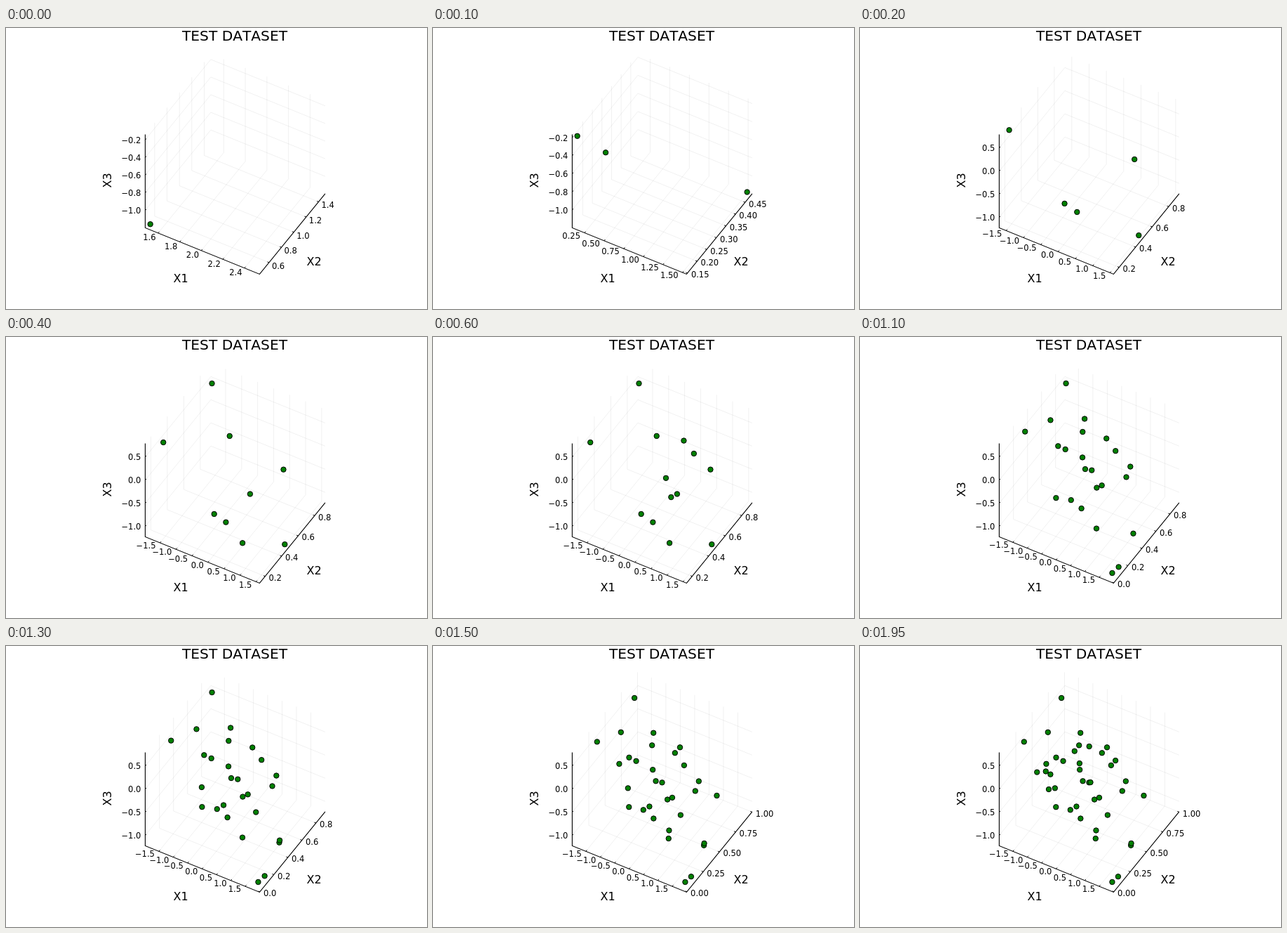
These frames come from a looping animation (600x400 px, 2 s). An HTML page with a canvas:

```html
<!DOCTYPE html>
<html lang="en">
<head>
<meta charset="utf-8">
<title>Test dataset</title>
<style>
  html, body { margin: 0; width: 600px; height: 400px; overflow: hidden; background: #fff; }
  canvas { display: block; }
</style>
</head>
<body>
<canvas id="plot" width="600" height="400"></canvas>
<script>
const ctx = document.getElementById('plot').getContext('2d');
const FONT = '"DejaVu Sans", sans-serif';
const STEP_MS = 50;

// All samples lie on one plane, so X1 and X2 give X3.
const plane = ([x, y]) => [x, y, -.018 - .557 * x - .646 * y];

// One sample joins the plot at every step.
const samples = [
  [1.51, .477], [.134, .155], [.41, .19], [-1.607, .214], [.366, .905],
  [-.84, .72], [.3, .526], [.94, .186], [-1.862, .902], [-.416, .885],
  [.27, .465], [-.09, .881], [-.085, .54], [-1.46, .516], [-.42, .545],
  [1.885, .023], [-1.03, .826], [-.93, .407], [-.78, .449], [.485, .798],
  [-.1, .037], [1.87, .121], [-.19, .49], [.155, .239], [1.48, .495],
  [-.43, .168], [.7, .477], [-.95, .264], [-.445, .975], [.84, .972],
  [.81, .251], [-.93, .113], [-.49, .099], [-.07, .555], [-.69, .81],
  [-.8, .633], [-.114, .959], [-.53, .59], [-.83, .204], [-.72, .227]
].map(plane);

// Unit cube to screen
const project = (u, v, w) => [198.4 + 163 * u + 93.5 * v, 284.4 + 66 * u - 114.5 * v - 133 * w];

function limits(values) {
  const lo = Math.min(...values);
  let hi = Math.max(...values);
  if (hi === lo) hi = lo + 1;
  const pad = .03 * (hi - lo);
  return [lo - pad, hi + pad];
}

// Round steps, as close to five ticks as possible
function makeTicks(lo, hi) {
  let best = null;
  for (let p = -2; p <= 0; p++) {
    for (const base of [1, 2, 2.5, 5]) {
      const step = base * 10 ** p;
      const first = Math.ceil(lo / step), count = Math.floor(hi / step) - first + 1;
      const miss = Math.abs(count - 5);
      if (!best || miss < best.miss) best = { step, first, count, miss };
    }
  }
  const { step, first, count } = best;
  const tenths = step * 10;
  const digits = Math.abs(tenths - Math.round(tenths)) > 1e-6 ? 2 : 1;
  return Array.from({ length: count }, (_, i) => {
    const value = (first + i) * step;
    return { at: (value - lo) / (hi - lo), text: value.toFixed(digits).replace('-', '\u2212') };
  });
}

function line(color, width, ...points) {
  ctx.strokeStyle = color;
  ctx.lineWidth = width;
  ctx.beginPath();
  points.forEach(p => ctx.lineTo(...p));
  ctx.stroke();
}

const grid = (...corners) => line('rgba(0,0,0,.1)', .6, ...corners.map(c => project(...c)));

function label(text, x, y, size, align = 'center') {
  ctx.font = `${size}px ${FONT}`;
  ctx.fontKerning = 'none';
  ctx.textAlign = align;
  ctx.fillStyle = '#000';
  ctx.fillText(text, x, y + size * .365);
}

function tick(text, [x, y], [mx, my], [dx, dy], align) {
  line('#000', 1, [x, y], [x + mx, y + my]);
  label(text, x + dx, y + dy, 11.5, align);
}

function draw(count) {
  const shown = samples.slice(0, count);
  const lims = [0, 1, 2].map(k => limits(shown.map(s => s[k])));
  const [xs, ys, zs] = lims.map(l => makeTicks(...l));
  const lone = count === 1;

  ctx.fillStyle = '#fff';
  ctx.fillRect(0, 0, 600, 400);

  for (const { at } of xs) grid([at, 0, 0], [at, 1, 0], [at, 1, 1]);
  for (const { at } of ys) grid([1, at, 0], [0, at, 0], [0, at, 1]);
  for (const { at } of zs) grid([0, 0, at], [0, 1, at], [1, 1, at]);

  line('#000', 1.1, project(0, 0, 1), project(0, 0, 0), project(1, 0, 0), project(1, 1, 0));

  const xOff = lone ? [-3.4, 6.4] : [-6, 4];
  const yOff = lone ? [4, 4.8] : [5.2, 2.2];
  for (const t of xs) tick(t.text, project(t.at, 0, 0), [1.5, -1.8], xOff, 'right');
  for (const t of ys) tick(t.text, project(1, t.at, 0), [-2.3, -.9], yOff, 'left');
  for (const t of zs) tick(t.text, project(0, 0, t.at), [1.5, -1.8], [-6, .4], 'right');

  label('TEST DATASET', 326, 10.8, 20.2);
  label('X1', 249, 356.5, 16);
  label('X2', 439, 332, 16);
  ctx.save();
  ctx.translate(144.3, 217);
  ctx.rotate(-Math.PI / 2);
  label('X3', 0, 0, 16);
  ctx.restore();

  ctx.fillStyle = '#008000';
  ctx.strokeStyle = '#000';
  ctx.lineWidth = 1;
  for (const s of shown) {
    const [x, y] = project(...s.map((value, k) => (value - lims[k][0]) / (lims[k][1] - lims[k][0])));
    ctx.beginPath();
    ctx.arc(x, y, 3.7, 0, 2 * Math.PI);
    ctx.fill();
    ctx.stroke();
  }
}

let start = null;
function loop(now) {
  if (start === null) start = now;
  draw(Math.floor((now - start) / STEP_MS) % samples.length + 1);
  requestAnimationFrame(loop);
}
draw(1);
requestAnimationFrame(loop);
</script>
</body>
</html>
```
